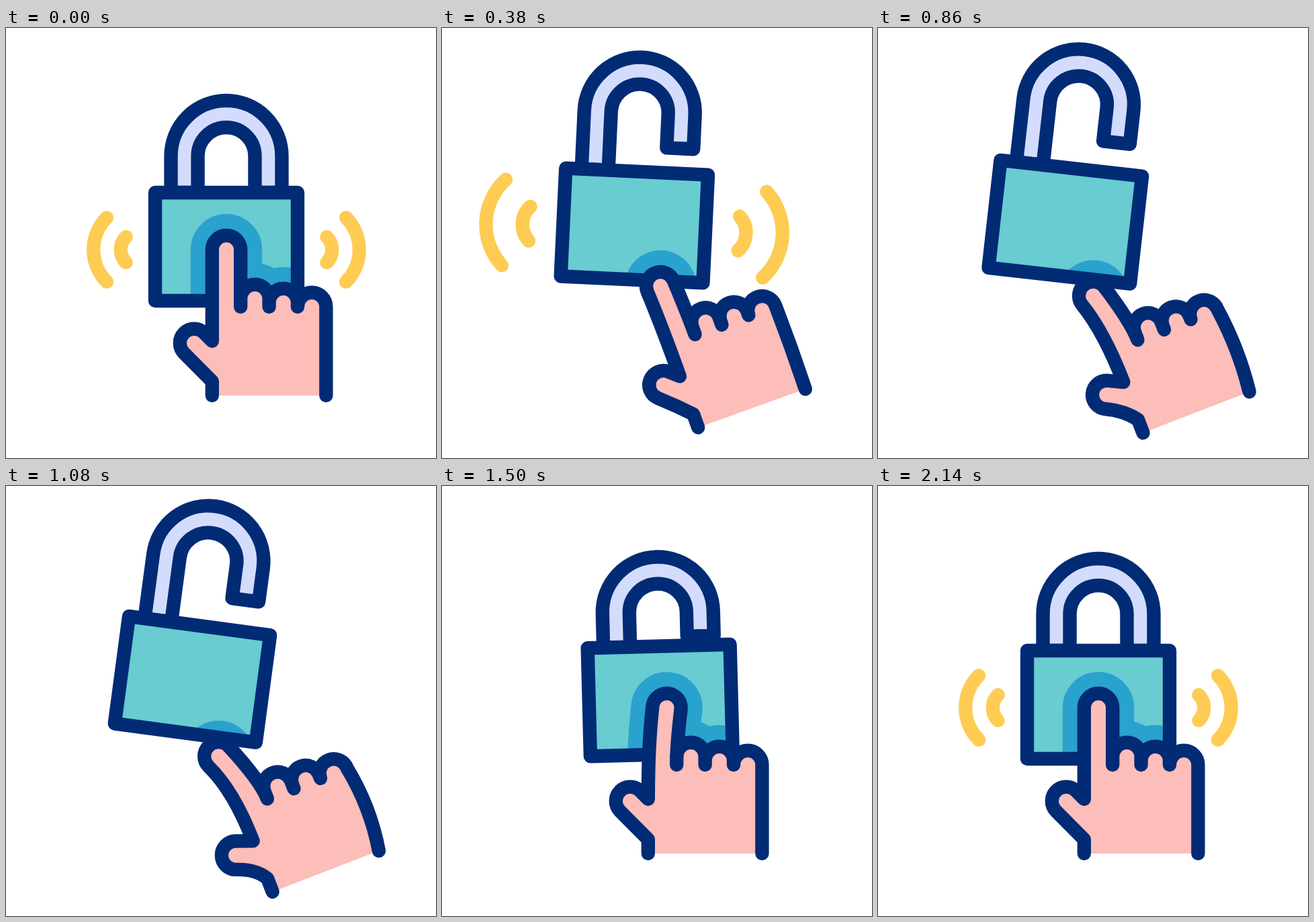
Animation of 640x640 px, one loop 2.2 s. Source, as an HTML page with a canvas:

```html
<!DOCTYPE html>
<html>
<head>
<meta charset="utf-8">
<style>
html, body { margin: 0; width: 100%; height: 100%; overflow: hidden; background: #fff; }
canvas { display: block; width: 640px; height: 640px; }
</style>
</head>
<body>
<canvas id="stage" width="640" height="640"></canvas>
<script>
const ctx = document.getElementById('stage').getContext('2d');
const LOOP = 2200, PI = Math.PI, RAD = PI / 180;
const NAVY = '#022b75', TEAL = '#68ccd1', SHADE = '#29a2cd';
const PINK = '#fdbdb9', LILAC = '#d3dcfd', YELLOW = '#fecc53';
const LINE = 20.4, FINGER = 21.2;

const span = (t, from, to) => Math.min(1, Math.max(0, (t - from) / (to - from)));

function ease(t, from, to) {
  const u = span(t, from, to);
  return u * u * (3 - 2 * u);
}

// The lock snaps open, drifts on, shuts, then rocks until it rests
function poseAt(t) {
  const shut = ease(t, 1210, 1500), settle = ease(t, 1820, 2140);
  const snap = ease(t, 100, 440) * (1 - shut);
  const drift = (1 - (1 - span(t, 100, 1210)) ** 1.4) * (1 - shut);
  const dip = shut - settle;
  const rock = 2 * ease(t, 1500, 1820) - shut - settle;
  const opening = t < 1210;
  const curl = 1.1 * drift ** 2;
  return {
    lock: {
      x: 328 - 42 * snap - 9 * drift - dip + 2.25 * rock,
      y: 325.5 - 32 * snap - 6 * drift - 2.6 * dip + 3.9 * rock,
      turn: 8 * drift - 1.5 * dip
    },
    lift: 32 * snap + 11 * drift - 5.2 * dip - 1.3 * rock,
    leg: 54.5 - 4.5 * snap - 8.75 * (dip - rock),
    hand: {
      x: 391.6 + 70 * snap + 15 * drift,
      y: 547 + 17 * snap + 10 * drift,
      turn: -21.7 * snap + 0.7 * drift
    },
    curl,
    bend: 24 * curl + 6.5 * rock,
    waveSize: opening ? 1 + 0.68 * ease(t, 100, 660) : 1 - (1 - span(t, 1556, 2116)) ** 3,
    waveAlpha: opening ? 1 - ease(t, 460, 820) : ease(t, 1560, 1740)
  };
}

function place({ x, y, turn }) {
  ctx.translate(x, y);
  ctx.rotate(turn * RAD);
}

function line(color, width = LINE) {
  ctx.strokeStyle = color;
  ctx.lineWidth = width;
  ctx.stroke();
}

function fill(color) {
  ctx.fillStyle = color;
  ctx.fill();
}

// Hand outline, measured from the middle of the wrist
function handPath({ curl, bend }) {
  const side = 4 * FINGER;
  const thumbTurn = -26 * curl * RAD, low = 135 * RAD + thumbTurn, high = low + PI;
  const thumbX = -111.6 - 4.8 * curl, thumbY = -78 + 7.8 * curl;
  const onThumb = (angle, along) => [
    thumbX + FINGER * Math.cos(angle) + along * Math.cos(thumbTurn + PI / 4),
    thumbY + FINGER * Math.sin(angle) + along * Math.sin(thumbTurn + PI / 4)
  ];
  const tilt = Math.atan(bend / 55), tipX = -3 * FINGER - bend, tipY = -217;
  const dx = FINGER * Math.cos(tilt), dy = FINGER * Math.sin(tilt);

  ctx.beginPath();
  ctx.moveTo(-side, 0);
  ctx.lineTo(-side, -21);
  ctx.quadraticCurveTo(...onThumb(low, 29), ...onThumb(low, 0));
  ctx.arc(thumbX, thumbY, FINGER, low, high);
  ctx.quadraticCurveTo(...onThumb(high, 8), -side, -81);
  ctx.quadraticCurveTo(-side, -161, tipX - dx, tipY + dy);
  ctx.arc(tipX, tipY, FINGER, PI - tilt, 2 * PI - tilt);
  ctx.quadraticCurveTo(-side / 2, -161, -side / 2, -132);
  for (let i = 0; i < 3; i++) {
    const x = (2 * i - 1) * FINGER;
    ctx.arc(x, -144 + 6 * i, FINGER, PI, 2 * PI);
    ctx.lineTo(x + FINGER, -132);
  }
  ctx.quadraticCurveTo(side + 12 * curl, -66, side, 0);
}

function drawWaves({ waveSize, waveAlpha }) {
  ctx.save();
  ctx.globalAlpha = waveAlpha;
  ctx.translate(0, 4.5);
  for (let side = 0; side < 2; side++) {
    for (const radius of [27, 67.5]) {
      ctx.beginPath();
      ctx.arc(130.3, 0, radius * waveSize, -PI / 4, PI / 4);
      line(YELLOW);
    }
    ctx.rotate(PI);
  }
  ctx.restore();
}

function drawShackle({ lift, leg }) {
  const y = -135 - lift;
  ctx.beginPath();
  ctx.moveTo(-82.5, -80.5);
  ctx.arc(0, y, 82.5, PI, 2 * PI);
  ctx.lineTo(82.5, y + leg);
  ctx.lineTo(42.5, y + leg);
  ctx.arc(0, y, 42.5, 0, PI, true);
  ctx.lineTo(-42.5, -80.5);
  ctx.closePath();
  fill(LILAC);
  line(NAVY);
}

function drawBody(pose) {
  const bodyPath = () => {
    ctx.beginPath();
    ctx.rect(-106, -80.5, 212, 161);
  };
  bodyPath();
  fill(TEAL);

  // Shade around the hand, kept inside the body
  ctx.save();
  ctx.clip();
  ctx.resetTransform();
  place(pose.hand);
  handPath(pose);
  fill(SHADE);
  line(SHADE, 64);
  ctx.restore();

  bodyPath();
  line(NAVY);
}

function frame(now) {
  const pose = poseAt(now % LOOP);
  ctx.resetTransform();
  ctx.fillStyle = '#fff';
  ctx.fillRect(0, 0, 640, 640);
  ctx.lineCap = ctx.lineJoin = 'round';

  place(pose.lock);
  drawWaves(pose);
  drawShackle(pose);
  drawBody(pose);

  ctx.resetTransform();
  place(pose.hand);
  handPath(pose);
  fill(PINK);
  line(NAVY);
  requestAnimationFrame(frame);
}
requestAnimationFrame(frame);
</script>
</body>
</html>
```
